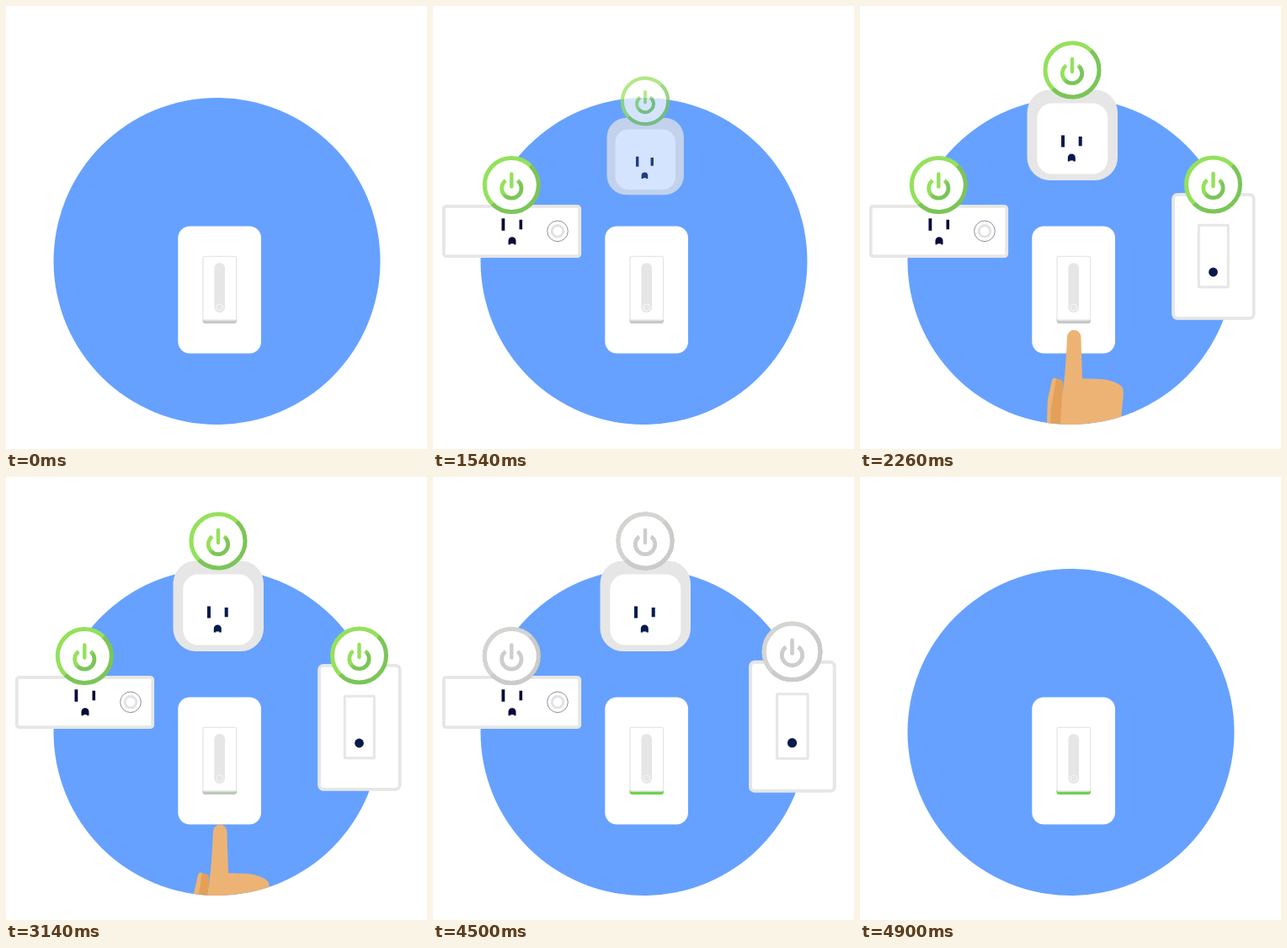
Animation of 500x526 px, one loop 4980 ms. Source, as an HTML page:

```html
<!DOCTYPE html>
<html lang="en">
<head>
<meta charset="utf-8">
<title>Smart switch</title>
<style>
  html, body { margin: 0; width: 100%; height: 100%; overflow: hidden; background: #fff; }
  svg { display: block; width: 500px; height: 526px; }
  .frame { fill: #fff; stroke: #e6e6e6; }
  .slot { fill: #071a4d; }
  .left .slot { fill: #08083a; }
</style>
</head>
<body>
<svg viewBox="0 0 500 526">
  <defs>
    <linearGradient id="greenRing" gradientUnits="userSpaceOnUse" x1="-24" y1="-24" x2="24" y2="24">
      <stop offset=".5" stop-color="#94e15b"/><stop offset=".5" stop-color="#7bc558"/>
    </linearGradient>
    <linearGradient id="greyRing" gradientUnits="userSpaceOnUse" x1="-24" y1="-24" x2="24" y2="24">
      <stop offset=".5" stop-color="#d4d4d4"/><stop offset=".5" stop-color="#cbcbcb"/>
    </linearGradient>
    <linearGradient id="greenIcon" gradientUnits="userSpaceOnUse" x1="-9" y1="-8" x2="9" y2="12">
      <stop offset=".4" stop-color="#94e15b"/><stop offset=".6" stop-color="#7bc558"/>
    </linearGradient>
    <clipPath id="disc"><circle cx="250.5" cy="303" r="194"/></clipPath>
    <circle id="ring" r="32" stroke-width="5"/>
    <path id="icon" fill="none" stroke-width="4.7" d="M-7 -7.4A11.7 11.7 0 1 0 7 -7.4"/>
    <path id="stem" fill="none" stroke-width="4.4" stroke-linecap="round" d="M0 -13V2"/>
    <path id="ground" d="M-4.5 4.5V0A4.5 4.5 0 0 1 4.5 0V4.5H2V3.6H-2V4.5Z"/>
    <g id="button">
      <use href="#ring" fill="#fff" stroke="url(#greenRing)"/>
      <use href="#icon" y="2" stroke="url(#greenIcon)"/>
      <use href="#stem" stroke="#94e15b"/>
    </g>
    <g id="buttonOff">
      <use href="#ring" fill="#fff" stroke="url(#greyRing)"/>
      <use href="#icon" y="2" stroke="#cdcdcd"/>
      <use href="#stem" stroke="#cdcdcd"/>
    </g>
  </defs>

  <circle cx="250.5" cy="303" r="194" fill="#66a1ff"/>

  <g class="device right">
    <rect class="frame" x="372" y="223.8" width="95.7" height="147" rx="5" stroke-width="3.8"/>
    <rect class="frame" x="402.3" y="260.3" width="35" height="73.5" rx="1" stroke-width="3"/>
    <circle class="slot" cx="419.5" cy="316" r="5.4"/>
    <use href="#button" x="419.5" y="212"/>
    <use class="off" href="#buttonOff" x="419.5" y="212"/>
  </g>

  <g class="device top">
    <rect x="198.5" y="99.5" width="107.5" height="107.5" rx="27" fill="#e6e6e6"/>
    <rect x="210.3" y="115.5" width="84" height="84" rx="18" fill="#fff"/>
    <path class="slot" d="M239 153.5h4v14h-4zM259.7 155h4v11.3h-4z"/>
    <use class="slot" href="#ground" x="251.3" y="180"/>
    <use href="#button" x="252" y="76"/>
    <use class="off" href="#buttonOff" x="252" y="76"/>
  </g>

  <g class="device left">
    <rect class="frame" x="12.8" y="237.8" width="161.4" height="59.4" rx="3" stroke-width="3.8"/>
    <path class="slot" d="M81.5 252.3h3.8v14.4h-3.8zM102.5 253.8h3.6v11.4h-3.6z"/>
    <use class="slot" href="#ground" x="94" y="278.7"/>
    <circle cx="148" cy="267.3" r="12.3" fill="#fff" stroke="#8d8f9e"/>
    <circle cx="148" cy="267.3" r="6.8" fill="#fff" stroke="#e2e2e2" stroke-width="3"/>
    <use href="#button" x="93.3" y="212.5"/>
    <use class="off" href="#buttonOff" x="93.3" y="212.5"/>
  </g>

  <rect x="204.3" y="261.5" width="98.7" height="151" rx="14" fill="#fff"/>
  <path id="bar" d="M233.5 371H274V374Q274 377 271 377H236.5Q233.5 377 233.5 374Z"/>
  <rect class="frame" x="234" y="297.4" width="39.6" height="75.6" rx="1.8" stroke-width="1.3"/>
  <rect x="247.4" y="305" width="12.6" height="59" rx="6.3" fill="#e6e6e6"/>
  <circle cx="253.7" cy="357.8" r="3.9" fill="none" stroke="#f8f8f8"/>

  <g clip-path="url(#disc)">
    <g id="hand">
      <path fill="#e2a05a" d="M228 473Q229 469 233 470L238 471.5Q242 473 241 479L238 560H221L223 495Z"/>
      <path fill="#edb375" d="M246 421A8.2 8.2 0 0 1 262.4 421L264 470.3L287 471Q304 473 311 480Q314 485 312 498L306 560H236L240 490Q244 468 246 421Z"/>
      <path fill="#edb375" d="M228 473Q229 469 233 470L231 483L227 505L224 560H221L223 495Z"/>
    </g>
  </g>
</svg>
<script>
const LOOP = 4980, START = 1300, STEP = 80;
const $$ = s => [...document.querySelectorAll(s)];
const bar = document.getElementById('bar');
const hand = document.getElementById('hand');
const offs = $$('.off');
const clamp = v => Math.min(1, Math.max(0, v));

// Linear interpolation through [x, y] points.
function along(points, x) {
  if (x <= points[0][0]) return points[0][1];
  for (let i = 1; i < points.length; i++) {
    const [x0, y0] = points[i - 1], [x1, y1] = points[i];
    if (x <= x1) return y0 + (y1 - y0) * (x - x0) / (x1 - x0);
  }
  return points[points.length - 1][1];
}

// Pop-out with overshoot: ms to scale.
const POP = [[0, 0], [60, .15], [115, .41], [188, .85], [225, 1.02], [261, 1.048],
  [268, 1.042], [276, 1.025], [335, 1.007], [355, 1]];
const FADE = 261;
// Hand offset: rises, rests, sinks.
const HAND = [[1860, 90], [1940, 66], [2020, 26], [2100, 0], [2180, -20], [2260, -28],
  [3060, -28], [3140, 0], [3220, 34], [3300, 68], [3380, 95]];

const devices = [
  { name: 'left', enter: 1185, leave: 4928 },
  { name: 'top', enter: 1352, leave: 4856 },
  { name: 'right', enter: 1519, leave: 4768 }
].map(d => ({ ...d, el: document.querySelector('.' + d.name) }));

const mix = (a, b, p) => `rgb(${a.map((v, i) => Math.round(v + (b[i] - v) * p))})`;

function draw(t) {
  for (const d of devices) {
    const age = t < 3000 ? t - d.enter : d.leave - t;
    const s = along(POP, age);
    d.el.setAttribute('transform', `translate(252 322) scale(${s}) translate(-252 -322)`);
    d.el.setAttribute('opacity', t < START ? 0 : clamp(age / FADE));
  }
  const off = clamp((t - 3140) / 480);
  offs.forEach(el => el.setAttribute('opacity', off));
  bar.setAttribute('fill', mix([200, 200, 200], [111, 208, 76], clamp((t - 3060) / 560)));
  hand.setAttribute('transform', `translate(0 ${along(HAND, t)})`);
}

const origin = performance.now();
function tick() {
  const t = (performance.now() - origin) % LOOP;
  draw(t < START ? 0 : START + Math.floor((t - START) / STEP) * STEP);
  requestAnimationFrame(tick);
}
tick();
</script>
</body>
</html>
```
